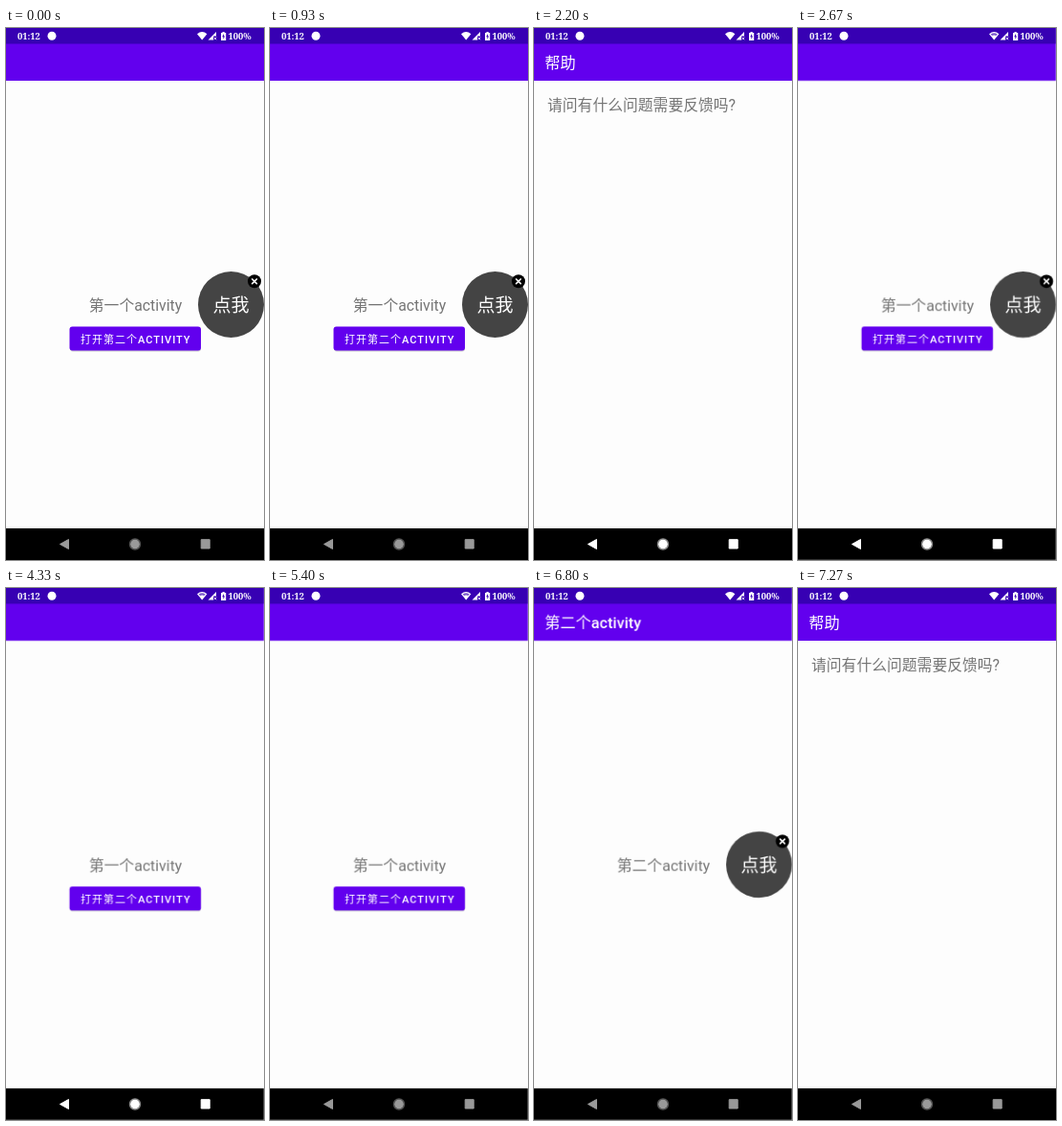
Write an HTML page without scripts that moves like this. It is 270 px wide and 555 px high and loops after 9190 ms.

```html
<!DOCTYPE html>
<html lang="zh">
<head>
<meta charset="utf-8">
<title>Floating button</title>
<style>
html, body { margin: 0; width: 100%; height: 100%; overflow: hidden; background: #000; }
svg { display: block; width: 270px; height: 555px; }
text { font-family: Roboto, "Noto Sans CJK SC", "Noto Sans CJK", sans-serif; }

.bg { fill: #fdfdfd; }
.bar { fill: #6200ee; }
.status { fill: #3700b3; }
.title { font-size: 16.2px; fill: #fff; }
.title .latin { font-weight: 500; }
.body { font-size: 15.8px; fill: #757575; }
.mid { text-anchor: middle; }
.label { font-size: 11px; font-weight: 500; letter-spacing: 1px; fill: #fff; }
.label .han { font-weight: 400; }
.sys text { font: 700 9.4px "Noto Serif", serif; fill: #fff; }

.screen { transform-origin: 135px 277.5px; }
.screen, .dim, .ball1, .nav, .weak { animation: 9190ms linear infinite both; }
#first { animation-name: first; }
#second { animation-name: second, secondFade; }
#help { animation-name: help, helpFade; }
#first .dim { animation-name: dim1; }
#second .dim { animation-name: dim2; }
.ball1 { animation-name: dismiss; animation-timing-function: step-end; }
.weak { animation-name: weak; animation-timing-function: step-end; }
.nav { animation-name: nav; }

/* Each zoom is two curves: a quick start to 40%, then a long settle. */
@keyframes first {
  0%, 11.643% { transform: scale(1); animation-timing-function: cubic-bezier(.3,0,.8,.15); }
  12.372% { transform: scale(1.02); animation-timing-function: cubic-bezier(.05,.7,.1,1); }
  15.996% { transform: scale(1.05); }
  24.701% { transform: scale(1.05); animation-timing-function: cubic-bezier(.3,0,.8,.15); }
  25.43% { transform: scale(1.03); animation-timing-function: cubic-bezier(.05,.7,.1,1); }
  29.053% { transform: scale(1); }
  60.283% { transform: scale(1); animation-timing-function: cubic-bezier(.3,0,.8,.15); }
  61.012% { transform: scale(1.02); animation-timing-function: cubic-bezier(.05,.7,.1,1); }
  64.635%, 100% { transform: scale(1.05); }
}
@keyframes second {
  0%, 60.283% { transform: scale(.85); animation-timing-function: cubic-bezier(.3,0,.8,.15); }
  61.012% { transform: scale(.91); animation-timing-function: cubic-bezier(.05,.7,.1,1); }
  64.635% { transform: scale(1); }
  74.755% { transform: scale(1); animation-timing-function: cubic-bezier(.3,0,.8,.15); }
  75.484% { transform: scale(1.02); animation-timing-function: cubic-bezier(.05,.7,.1,1); }
  79.108%, 100% { transform: scale(1.05); }
}
@keyframes secondFade {
  0%, 60.664% { opacity: 0; }
  61.208%, 100% { opacity: 1; }
}
@keyframes help {
  0%, 11.643% { transform: scale(.85); animation-timing-function: cubic-bezier(.3,0,.8,.15); }
  12.372% { transform: scale(.91); animation-timing-function: cubic-bezier(.05,.7,.1,1); }
  15.996% { transform: scale(1); }
  24.701% { transform: scale(1); animation-timing-function: cubic-bezier(.3,0,.8,.15); }
  25.43% { transform: scale(.96); animation-timing-function: cubic-bezier(.05,.7,.1,1); }
  29.053% { transform: scale(.9); }
  29.06%, 74.755% { transform: scale(.85); animation-timing-function: cubic-bezier(.3,0,.8,.15); }
  75.484% { transform: scale(.91); animation-timing-function: cubic-bezier(.05,.7,.1,1); }
  79.108%, 100% { transform: scale(1); }
}
@keyframes helpFade {
  0%, 12.024% { opacity: 0; }
  12.568%, 25.082% { opacity: 1; }
  25.985%, 75.136% { opacity: 0; }
  75.68%, 100% { opacity: 1; }
}
@keyframes dim1 {
  0%, 11.643% { opacity: 0; }
  12.8%, 16% { opacity: .2; }
  16.01%, 60.283% { opacity: 0; }
  61.4%, 100% { opacity: .2; }
}
@keyframes dim2 {
  0%, 74.755% { opacity: 0; }
  75.9%, 100% { opacity: .2; }
}
@keyframes dismiss {
  0% { opacity: 1; }
  39.935% { opacity: .5; }
  40.588%, 100% { opacity: 0; }
}
@keyframes weak {
  0% { opacity: 0; }
  25% { opacity: .65; }
  60%, 100% { opacity: 0; }
}
@keyframes nav {
  0%, 22.52% { color: #999; }
  23.2%, 47.116% { color: #fff; }
  56.583%, 100% { color: #999; }
}
</style>
</head>
<body>
<svg viewBox="0 0 270 555">
  <defs>
    <g id="frame">
      <rect class="bg" width="270" height="555"/>
      <rect class="bar" width="270" height="55"/>
      <rect class="status" width="270" height="16.5"/>
      <rect y="522" width="270" height="33"/>
    </g>
    <g id="ball">
      <circle cx="235.5" cy="288.5" r="34.5" fill="#444"/>
      <text class="mid" x="235.5" y="296" font-size="19" fill="#fff">点我</text>
      <circle cx="260" cy="264.3" r="7"/>
      <path d="M257.2 261.5l5.6 5.6m0-5.6l-5.6 5.6" stroke="#fff" stroke-width="1.6"/>
    </g>
  </defs>

  <g id="first" class="screen">
    <use href="#frame"/>
    <text class="body mid" x="135.5" y="295">第一个activity</text>
    <rect x="67" y="313" width="137" height="24.5" rx="3" opacity=".2"/>
    <rect class="bar" x="66.5" y="311.5" width="137.5" height="25" rx="3"/>
    <text class="label" x="78" y="328.5"><tspan class="han">打开第二个</tspan>ACTIVITY</text>
    <g class="ball1"><use href="#ball"/></g>
    <rect class="dim" width="270" height="555"/>
  </g>

  <g id="second" class="screen">
    <use href="#frame"/>
    <text class="title" x="11.3" y="42">第二个<tspan class="latin">activity</tspan></text>
    <text class="body mid" x="135.5" y="295">第二个activity</text>
    <use href="#ball"/>
    <rect class="dim" width="270" height="555"/>
  </g>

  <g id="help" class="screen">
    <use href="#frame"/>
    <text class="title" x="11.3" y="42">帮助</text>
    <text class="body" x="14" y="86">请问有什么问题需要反馈吗?</text>
  </g>

  <g class="sys" fill="#fff">
    <text x="12" y="12">01:12</text>
    <circle cx="48" cy="8.3" r="4.5"/>
    <path d="M200 6.2q5.2-4.2 10.4 0l-5.2 6.3z"/>
    <path class="weak status" d="M201.6 6.4q3.6-2.4 7.2 0l-1.4 1.7q-2.2-1-4.4 0z"/>
    <path d="M220 4v4.5h-3v4h-5.5z"/>
    <path d="M217.6 9.6l2.6 2.6m0-2.6l-2.6 2.6" stroke="#fff" stroke-width=".8"/>
    <path d="M225 5h1.5v-1h2.2v1h1.5v8h-5.2z"/>
    <path class="status" d="M228 6l-1.8 3.3h1.2v2.4l1.7-3.3h-1.1z"/>
    <text x="232.5" y="12">100%</text>
  </g>

  <g class="nav" fill="currentColor" stroke="currentColor" stroke-linejoin="round">
    <path d="M56.5 538.5l9-5v10z"/>
    <circle cx="135" cy="538.5" r="4.9" stroke="none"/>
    <circle cx="135" cy="538.5" r="5.6" fill="none" stroke-width="1.2" opacity=".55"/>
    <rect x="204.2" y="533.7" width="9" height="9.3"/>
  </g>
</svg>
</body>
</html>
```
